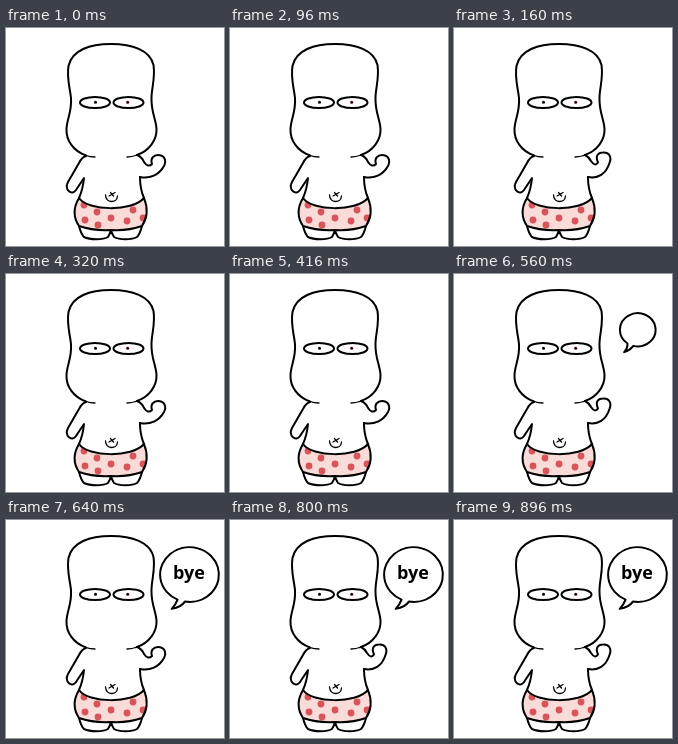
Write an HTML page that moves like this. It is 218 by 218 pixels and loops after 960 ms.

```html
<!DOCTYPE html>
<html lang="en">
<head>
<meta charset="utf-8">
<title>Waving bye</title>
<style>
  html, body { margin: 0; width: 100%; height: 100%; overflow: hidden; background: #fff; }
  svg { display: block; width: 100vw; height: 100vh; }
  .line { fill: none; stroke: #000; stroke-width: 2; stroke-linecap: round; stroke-linejoin: round; }
  .thin { stroke-width: 1.3; }
  .dots { stroke: #d9535a; stroke-width: 6.8; stroke-linecap: round; }
  text { font: bold 18px "Open Sans", "Noto Sans", sans-serif; }
</style>
</head>
<body>
<svg viewBox="0 0 218 218">
  <defs>
    <path id="shorts" d="M73 170C82 183 126 184 138 170C142 180 142 189 136 198Q122 203 105 202Q87 203 73 198C67 189 67 180 73 170Z"/>
    <clipPath id="cloth"><use href="#shorts"/></clipPath>
  </defs>

  <!-- legs and shorts -->
  <path class="line" d="M73 198Q75 206 78 209C84 212 97 212 102 209Q104 206 105 202Q106 206 108 209C113 212 126 212 131 209Q134 206 136 198"/>
  <use href="#shorts" fill="#f9dcd8"/>
  <path class="dots" clip-path="url(#cloth)" d="M78 177h.01M91 184h.01M79 192h.01M92 197h.01M105 190h.01M121 193h.01M127 182h.01M137 190h.01"/>
  <use href="#shorts" class="line"/>

  <!-- body, left arm, navel -->
  <path class="line" d="M80 128Q76 129 73 135L62 154C58 162 66 168 70 162L78 150Q77 161 73 170M134 149Q134 161 138 170"/>
  <path class="line thin" d="M99.500 167C100 175.500 111 175.500 111.500 168M103 168L109 164.500M104.500 164.500L107.500 168"/>
  <path id="arm" class="line"/>

  <!-- head -->
  <path class="line" d="M80 127.500C67 123 60 112 60.500 101C61 90 66 84 65 70C64 60 60.500 50 62.500 38C66 22 84 16 105 16C126 16 144 22 147.500 37C149.500 50 145.500 60 145.500 70C145 84 150 91 150.500 101C151 112 143 123 131 127"/>
  <path class="line thin" d="M80 127.500Q84 129 89 129M131 127Q126 129 121 129"/>
  <g class="line">
    <ellipse cx="89" cy="74.500" rx="15" ry="5.600"/>
    <ellipse cx="122.500" cy="74.500" rx="15" ry="5.600"/>
  </g>
  <circle cx="89.500" cy="74.300" r="1.500"/>
  <circle cx="121.700" cy="74.300" r="1.500" fill="#300"/>

  <path id="bubble" class="line"/>
  <text id="word" x="183" y="59" text-anchor="middle">bye</text>
</svg>
<script>
const $ = id => document.getElementById(id);
const LOOP = 960, BEAT = 160;
const BUBBLE_START = 480, BUBBLE_STEP = 80, LAST_STEP = 2;

const armOut = "M131 127Q136 129 138 134Q142 140 146 136C144 130 148 127 152 127C158 127 161 132 158 138C153 147 144 151 134 149";
const armUp = "M131 127Q135 129 137 133Q141 139 144 134.5C141 128 144 124.500 149 124.500C155 124 158 129 155.500 135C152 146 144 151 134 149";

// Open ellipse closed by a pointed tail; each step is 1.65 times larger
function bubblePath(step) {
  const rx = 10.8 * 1.65 ** step, ry = rx * 0.93;
  const cx = 184 - step / 4, cy = 57 - step * 1.2;
  const tipX = cx - 7 - rx * 0.37, tipY = cy + 4 + rx * 1.03;
  const at = degrees => {
    const angle = degrees * Math.PI / 180;
    return `${cx + rx * Math.cos(angle)} ${cy + ry * Math.sin(angle)}`;
  };
  const right = at(109 - step * 5), left = at(138 - step * 12);
  return `M${left}A${rx} ${ry} 0 1 1 ${right}Q${tipX + rx / 3} ${tipY - 2} ${tipX} ${tipY}Q${tipX + 4} ${tipY - 4} ${left}Z`;
}

function draw(time) {
  const t = time % LOOP;
  const step = Math.min(LAST_STEP, Math.floor((t - BUBBLE_START) / BUBBLE_STEP));
  $("arm").setAttribute("d", Math.floor(t / BEAT) % 2 ? armUp : armOut);
  $("bubble").setAttribute("d", step < 0 ? "" : bubblePath(step));
  $("word").style.display = step === LAST_STEP ? "" : "none";
}

let start;
function tick(now) {
  start ??= now;
  draw(now - start);
  requestAnimationFrame(tick);
}
draw(0);
requestAnimationFrame(tick);
</script>
</body>
</html>
```
